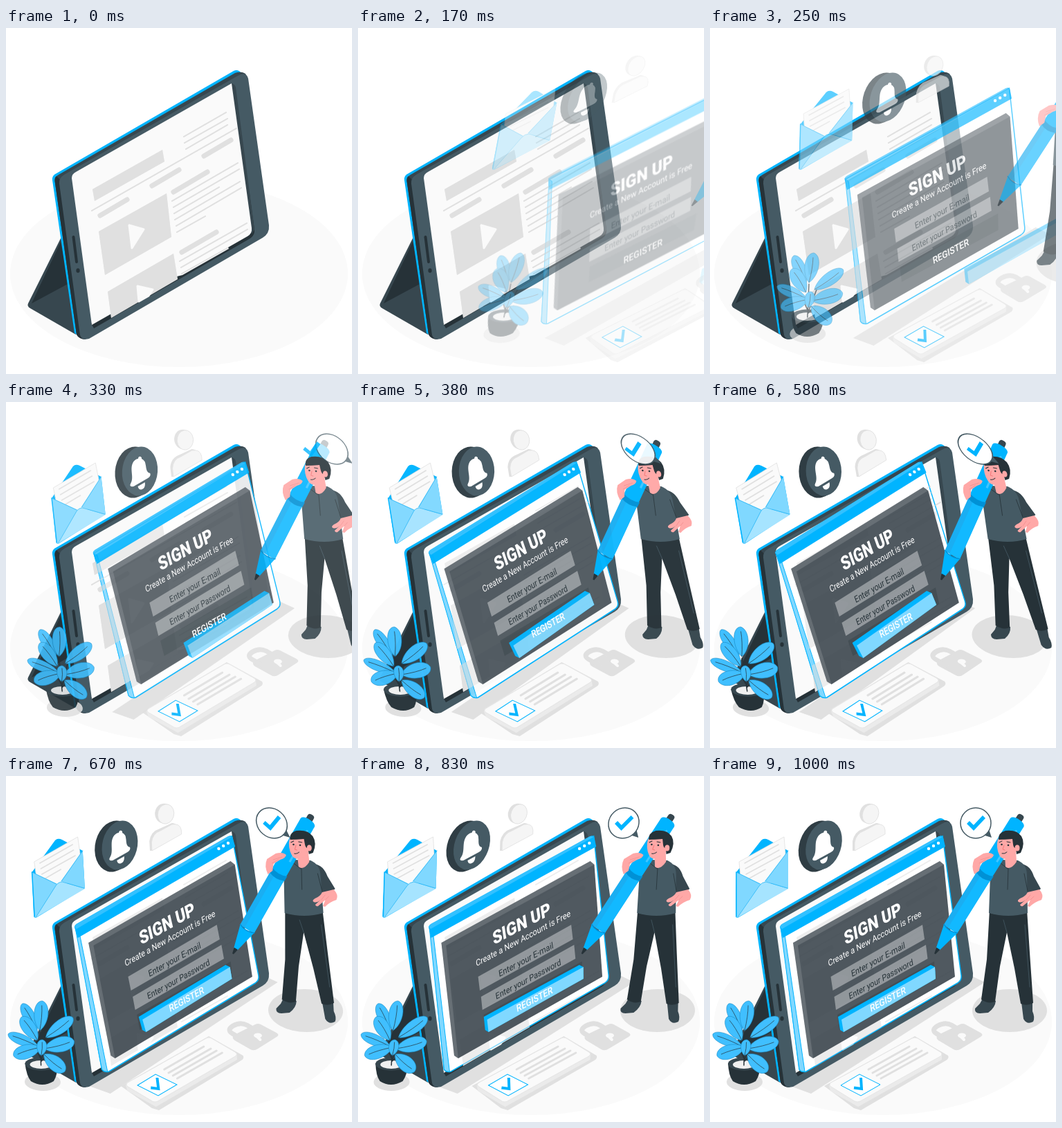
These frames come from a looping animation (500 by 500 pixels, 1.04 s). An HTML page:

```html
<!DOCTYPE html>
<html lang="en">
<head>
<meta charset="utf-8">
<title>Sign up</title>
<style>
  html, body { margin: 0; width: 100%; height: 100%; overflow: hidden; background: #fff; }
  svg { display: block; width: 100%; height: 100%; }
  text { font-family: Roboto, Inter, sans-serif; text-anchor: middle; }
  .blue { fill: #00b4ff; }
  .pale { fill: #80d8ff; }
  .ink { fill: #263238; }
  .dark { fill: #37474f; }
  .slate { fill: #455a64; }
  .grey { fill: #e0e0e0; }
  .skin { fill: #ffa8a7; }
  .line { fill: none; stroke-linecap: round; stroke-linejoin: round; }
</style>
</head>
<body>
<svg viewBox="0 0 500 500">
  <ellipse cx="250" cy="355" rx="244" ry="135" fill="#fafafa"/>

  <!-- Floor shadows: data-y is the skew centre of each flying part -->
  <g data-y="375"><path class="grey" d="M116 448L146 459L397 298L376 288Z"/></g>
  <g data-y="339"><ellipse class="grey" cx="433" cy="339" rx="54" ry="31"/></g>

  <!-- Tablet -->
  <path class="dark" d="M80 302L32 398Q30 402 35 405L101 443Z"/>
  <path class="ink" d="M79 309L37 398L91 369Z"/>
  <path class="blue" d="M99 441L67 220Q66 213 73 210L329 62Q335 59 340 65L112 449Z"/>
  <path class="dark" d="M102 443L70.500 221Q70 215 76 212L331 65Q340 62 346 66L350 75L115 450Q105 449 102 443Z"/>
  <path class="ink" d="M102 443L70.500 221Q70 216 73 214L79 220L109 445L114 450Q105 449 102 443Z"/>
  <path class="slate" d="M77 225Q76 217 84 212L335 69Q347 62 350 73L380 285Q381 297 371 303L120 449Q110 452 107 444Z"/>
  <path class="ink" d="M123 427L127 434L353 304Q360 299 359 291L352 240L300 310Z"/>
  <path class="dark" d="M326 80Q331 81 332 86L359 291L355 298L340 220Z"/>
  <path fill="#fafafa" d="M95 217Q95 211 101 208L326 80L355 289Q356 297 349 301L321 317L322 319L255 357L247 359L124 429Z"/>
  <path class="line" stroke="#263238" stroke-width="4" d="M97.500 302L102 338"/>
  <ellipse class="ink" cx="104" cy="350.500" rx="2.600" ry="3.300"/>
  <g id="page">
    <path class="grey" d="M125 233L226 176L229 193L128 250ZM134 294L232 239L239 302L143 357ZM147 381L242 326L248 363L152 419Z"/>
    <path class="line" stroke="#e0e0e0" stroke-width="7" d="M136 271L175 248M211 228L250 205M286 185L325 162M242 237L291 208M254 324L304 295"/>
    <path class="line" stroke="#e0e0e0" stroke-width="2" d="M124 264L333 145M257 157L318 122M258 166L320 131M260 175L320 140M240 250L335 195M242 259L337 204M243 268L308 230M244 277L338 222M246 286L340 231M247 295L288 272M251 337L348 282M253 346L349 291M254 355L320 318"/>
    <path fill="#fafafa" stroke="#fafafa" stroke-width="3" stroke-linejoin="round" d="M178 285L199 291L182 318ZM190 373L212 378L206 387L192 395Z"/>
  </g>

  <!-- Window card, with the page shining through it -->
  <g data-y="256">
    <path fill="#fff" stroke="#00b4ff" stroke-width="1.500" d="M103 218L336 87L363 288Q364 295 358 299L139 427Q133 429 129 424Z"/>
    <path class="pale" stroke="#00b4ff" d="M102 218L107 222L137 427Q132 428 129 424Z"/>
  </g>
  <use href="#page" opacity=".55"/>
  <g data-y="256">
    <path class="blue" d="M101 218Q102 215 104 214L331 87Q336 85 337 89L340 102L105 234Z"/>
    <path fill="#33c1ff" d="M101 218L104 214L331 87L336 88L104 221Z"/>
    <g fill="#fff"><circle cx="316" cy="105" r="2.200"/><circle cx="323" cy="101" r="2.200"/><circle cx="330" cy="97" r="2.200"/></g>

    <path fill="#38424a" opacity=".88" d="M120 241L332 123L338 128L354 290L149 408L143 404Z"/>
    <path fill="#fff" opacity=".13" d="M120 241L332 123L338 128L127 245L149 408L143 404Z"/>
    <path fill="#263238" opacity=".28" d="M184 345L324 268L325 292L187 367Z"/>
    <path fill="#fff" opacity=".38" d="M174.500 290L307 215L310 236L177.500 310ZM179.500 319L312 244L314.500 264L182 338Z"/>
    <g data-y="321">
      <path class="blue" d="M185 348L319 273L325 276L326 293L193 370L188 367Z"/>
      <path class="pale" d="M190 352L325 276L326 293L193 370Z"/>
    </g>
    <g id="labels" fill="#fff"></g>
  </g>

  <!-- Envelope -->
  <g data-y="147" >
    <path class="blue" d="M38 139L74 93Q78 89 84 92L113 108V162L40 205Q37 205 37 202Z"/>
    <path fill="#fafafa" stroke="#e0e0e0" stroke-width=".8" d="M42 124L107 88L111 135L82 160L46 168Z"/>
    <path class="line" stroke="#e0e0e0" stroke-width="1.500" d="M50 126L99 99M51 134L100 107M52 142L102 115M53 150L80 135"/>
    <path class="pale" d="M38 139L74 156L40 205Q37 205 37 202ZM113 108L79 152L113 163Z"/>
    <path fill="#a6e4ff" d="M39 205L71 159Q75 153 81 153L113 163Z"/>
    <path class="line" stroke="#29b6f6" stroke-width=".8" d="M38 139L72 156M40 204L71 159Q75 153 81 153L112 162M80 152L113 108"/>
    <path class="line" stroke="#00b4ff" stroke-width="1.500" d="M38 139L38 203"/>
  </g>

  <!-- Bell -->
  <g data-y="100">
    <ellipse fill="#2f3d44" cx="156" cy="101.500" rx="27" ry="38" transform="rotate(18 156 101.500)"/>
    <ellipse class="slate" cx="164.500" cy="100" rx="25" ry="36.500" transform="rotate(18 164.500 100)"/>
    <path fill="#fff" d="M149 118C156 109 149 96 157 86Q161 82 164 82Q165 78 168 79Q170 80 169 82Q174 84 174 92C174 101 176 102 179 103Q180 107 175 110L153 122Q146 123 149 118Z"/>
    <path fill="#fff" d="M159 122L170 116Q170 124 165 126Q160 128 159 122Z"/>
  </g>

  <!-- Contact -->
  <g data-y="73">
    <g class="grey"><ellipse cx="229" cy="54" rx="12.500" ry="14.500" transform="rotate(20 229 54)"/>
      <path d="M206 108V94Q209 80 222 76L240 68Q250 68 250 84L209 108Z"/></g>
    <g fill="#f5f5f5" stroke="#e0e0e0" stroke-width=".8">
      <path d="M209 108V96Q211 83 223 79L240 70Q252 68 253 78V84Z"/>
      <ellipse cx="232" cy="55" rx="11.500" ry="14.500" transform="rotate(20 232 55)"/></g>
  </g>

  <!-- Padlock -->
  <g data-y="375">
    <path class="grey" d="M330 374L361 359Q365 357 369 359L391 371Q396 374 391 377L363 394Q357 398 352 395L330 382Q325 378 330 374Z"/>
    <path class="line" stroke="#e0e0e0" stroke-width="7" d="M340 380L327 372Q319 367 329 361Q340 355 349 360L362 368"/>
    <ellipse cx="364" cy="375" rx="6" ry="3.500" fill="#fafafa"/>
    <path class="line" stroke="#fafafa" stroke-width="4" d="M362 376L367 381"/>
  </g>

  <!-- Form slip -->
  <g data-y="429">
    <path class="grey" d="M165 448L296 376L344 404Q346 408 341 411L218 483L208 480Z"/>
    <path fill="#ebebeb" d="M172 447L295 379L335 402V410L214 478L174 455Z"/>
    <path fill="#fafafa" stroke="#e6e6e6" d="M175 443L292 379Q296 377 300 379L333 399Q337 402 333 405L217 470Q213 472 209 470L175 449Q171 446 175 443Z"/>
    <path fill="#fff" stroke="#00b4ff" d="M189 447L216 431L246 446L218 462Z"/>
    <path fill="none" stroke="#00b4ff" stroke-width="4" d="M208 450.500L219 452L218 436"/>
    <path class="line" stroke="#e0e0e0" stroke-width="3" d="M229 424L288 391M235 429L298 394M241 433L306 397M247 437L314 400"/>
  </g>

  <!-- Man with pen -->
  <g data-y="205">
    <path class="dark" d="M395 320L390 329L383 336Q382 343 390 343L402 342Q412 335 413 325ZM450 327L453 351Q458 360 467 355Q470 349 466 340V327Z"/>
    <path class="ink" d="M404 193L400 265L392 323Q402 330 412 326L419 275L429 226L440 278L449 329Q458 333 467 328L462 255L458 193Z"/>
    <path class="line" stroke="#455a64" stroke-width=".8" d="M429 226L424 208M455 215L462 305"/>
    <path class="dark" d="M410 131Q403 140 400 151L390 172L381 165L392 130Z"/>
    <path class="dark" d="M450 127Q463 129 468 145L478 163Q470 171 457 172Z"/>
    <path class="slate" d="M421 121L445 122Q458 128 458 143L459 198Q431 206 403 198L405 144Q407 129 421 121Z"/>
    <path class="line" stroke="#263238" stroke-width=".8" d="M431 134L430 164M454 141L459 166M420 126L430 134L443 124"/>
    <path class="skin" d="M459 168L476 164Q483 172 479 179Q469 182 462 189L459 188L463 179L452 188Q449 189 448 186L456 179Q450 184 446 182Q443 180 448 177Q456 174 459 168Z"/>
    <path class="line" stroke="#f28f8f" stroke-width=".8" d="M463 179L468 174M457 179L463 172"/>

    <g transform="translate(325 257) rotate(32)">
      <rect class="dark" x="-5" y="-237" width="10" height="20" rx="4"/>
      <path class="blue" d="M-11.500 -128L-11.500 -224Q-10 -229 0 -229Q10 -229 11.500 -224L11.500 -128Z"/>
      <path fill="#1aaef2" d="M-11.500 -42V-134Q0 -129 11.500 -134V-42Z"/>
      <path fill="#12b9ff" d="M-4 -42V-132L11.500 -134V-42Z"/>
      <path fill="#0091d6" d="M-12.500 -140Q0 -134 12.500 -140V-132Q0 -126 -12.500 -132Z"/>
      <path class="pale" opacity=".5" d="M4 -214L7 -214V-160L4 -160Z"/>
      <path class="blue" d="M-11.500 -43Q0 -37 11.500 -43L3 -8H-3Z"/>
      <path class="line" stroke="#0091d6" stroke-width="1.500" d="M-11.500 -43Q0 -37 11.500 -43"/>
      <path class="ink" d="M-3 -9H3L1 0H-1Z"/>
    </g>

    <path class="skin" d="M382 142Q377 130 382 120L395 112Q405 109 410 114Q409 119 401 121L391 127L389 137Z"/>
    <path class="line" stroke="#f28f8f" stroke-width=".8" d="M391 121L404 117M389 126L398 121"/>
    <path class="skin" d="M426 112L442 108L443 124Q434 137 427 131Z"/>
    <path class="skin" d="M416 91Q413 104 418 114Q422 122 431 119Q441 116 444 106L450 101L444 86L424 85Z"/>
    <path class="ink" d="M417 92Q416 82 427 79Q443 77 450 87Q456 97 449 111L443 113L442 104Q439 105 438 99L437 91Q426 92 417 92Z"/>
    <ellipse class="skin" cx="444" cy="104" rx="3.500" ry="4.500"/>
    <circle class="ink" cx="421.500" cy="99" r="1.300"/><circle class="ink" cx="431" cy="100" r="1.300"/>
    <path class="line" stroke="#263238" d="M418 96L422 94M429 95L434 96M422 112Q426 113 429 110"/>
    <path class="line" stroke="#f27b7b" d="M425 100L423 106L426 107"/>
  </g>

  <g data-y="68" data-n="3">
    <path class="slate" d="M394 85L407 89L403 77Z"/>
    <circle cx="384" cy="68" r="22" fill="#fff" stroke="#455a64" stroke-width="1.500"/>
  </g>
  <g data-y="68" data-n="2">
    <path fill="none" stroke="#00b4ff" stroke-width="5.500" d="M373 67L381 75L396 59"/>
  </g>

  <!-- Plant -->
  <g data-y="390">
    <ellipse class="grey" cx="50" cy="442" rx="26" ry="13"/>
    <path class="ink" d="M26 415Q27 433 33 441Q49 451 66 441Q72 433 73 415Z"/>
    <ellipse class="dark" cx="49.500" cy="416" rx="23.500" ry="9.500"/>
    <ellipse cx="49" cy="417" rx="16" ry="6" fill="#f0f0f0"/>
    <path class="line" stroke="#263238" stroke-width="1.500" d="M49 418L50 370M50 410L62 376M50 410L36 380M50 412L60 402"/>
    <g id="leaves" fill="#40bfff" stroke="#168ac4" stroke-width=".6"></g>
  </g>
</svg>
<script>
const $ = id => document.getElementById(id);

// Text lies on the tilted plane of the panel: words, centre x and y, size, weight, colour
const labels = [
  ['SIGN UP', 235, 213, 25.5, 900, '#fff'],
  ['Create a New Account is Free', 238, 234.5, 12.4, 400, '#fff'],
  ['Enter your E-mail', 243, 265, 12.5, 400, '#263238'],
  ['Enter your Password', 247, 293.5, 12.2, 400, '#263238'],
  ['REGISTER', 257, 322.5, 13.6, 500, '#fff']
];
$('labels').innerHTML = labels.map(([words, x, y, size, weight, fill]) =>
  `<text transform="matrix(.83 -.45 .18 1 ${x} ${y})" y="${size * .35}"
    font-size="${size}" font-weight="${weight}" fill="${fill}">${words}</text>`).join('');

// Leaves: base x and y, tip x and y, half width
const leaves = [
  [46, 368, 27, 329, 12], [50, 368, 56, 325, 14], [46, 382, 25, 348, 14],
  [58, 378, 99, 349, 13], [47, 391, 4, 373, 11], [55, 394, 99, 383, 15],
  [50, 392, 10, 404, 14], [54, 402, 83, 427, 15], [50, 404, 53, 381, 10]
];
$('leaves').innerHTML = leaves.map(([x, y, u, v, w]) => {
  const len = Math.hypot(u - x, v - y), nx = (y - v) / len * w, ny = (u - x) / len * w;
  const ctrl = (f, s) => `${x + (u - x) * f + nx * s} ${y + (v - y) * f + ny * s}`;
  return `<path d="M${x} ${y}C${ctrl(.3, 1)} ${ctrl(.95, .9)} ${u} ${v}
    C${ctrl(.95, -.9)} ${ctrl(.3, -1)} ${x} ${y}Z"/>
    <path d="M${x} ${y}Q${ctrl(.5, .15)} ${ctrl(.85, 0)}" fill="none" stroke="#263238" stroke-width=".7"/>`;
}).join('');

const LOOP = 1040, FPS = 24, LEAD = 16;
const clamp = v => Math.max(0, Math.min(1, v));
const tan = deg => Math.tan(deg * Math.PI / 180);
const mix = (a, b, p) => a + (b - a) * p;

// cubic-bezier(.36, -.01, .5, 1.38), solved by bisection
const curve = (a, b, s) => 3 * (1 - s) ** 2 * s * a + 3 * (1 - s) * s * s * b + s ** 3;
function ease(x) {
  let lo = 0, hi = 1;
  for (let i = 0; i < 24; i++) {
    const mid = (lo + hi) / 2;
    if (curve(.36, .5, mid) < x) lo = mid; else hi = mid;
  }
  return curve(-.01, 1.38, lo);
}

// Fly in from the right, lean over, swing back and settle
function pose(ms) {
  if (ms < 600) {
    const p = ease(ms / 600);
    return { dx: mix(250, 0, p), skew: mix(tan(-20), tan(10), p), alpha: clamp(p) };
  }
  const skew = ms < 800 ? mix(tan(10), tan(-2), ease((ms - 600) / 200))
    : mix(tan(-2), 0, ease(clamp((ms - 800) / 200)));
  return { dx: 0, skew, alpha: 1 };
}

const parts = [...document.querySelectorAll('[data-y]')];
const start = performance.now();

function draw() {
  const t = Math.max(0, performance.now() - start) % LOOP;
  const step = Math.min(FPS, Math.floor((t + 5) * FPS / 1000));
  const { dx, skew, alpha } = pose(step * 1000 / FPS + LEAD);
  for (const part of parts) {
    const n = +(part.dataset.n || 1), k = skew * n;
    part.setAttribute('transform', `matrix(1 0 ${k} 1 ${dx * n - k * part.dataset.y} 0)`);
    part.setAttribute('opacity', alpha ** n);
  }
  requestAnimationFrame(draw);
}
draw();
</script>
</body>
</html>
```
